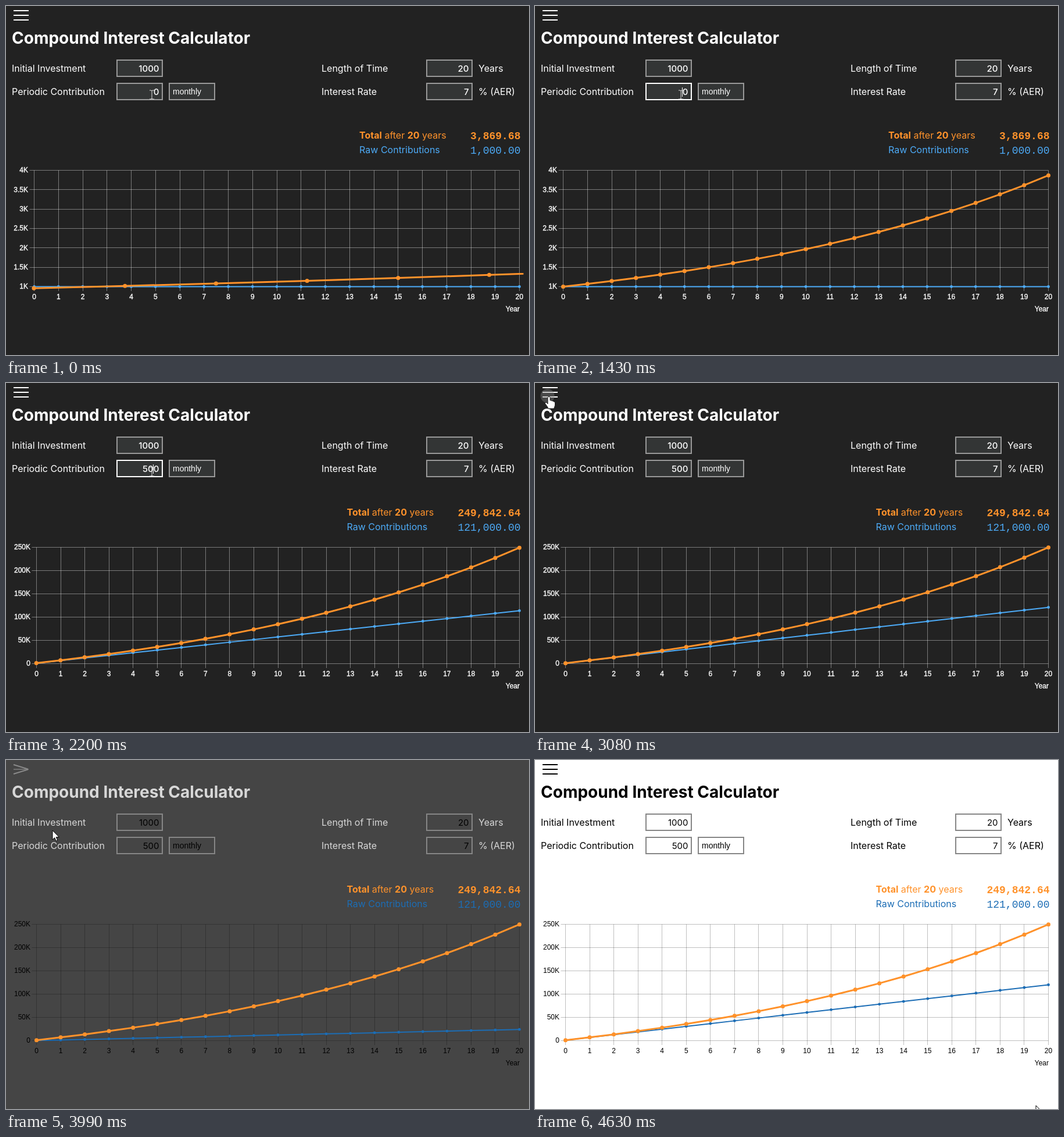
An HTML page that plays this animation: 900 px wide and 600 px high, repeating every 4.66 s.

```html
<!DOCTYPE html>
<html lang="en">
<head>
<meta charset="utf-8">
<title>Compound Interest Calculator</title>
<style>
html, body { margin: 0; width: 100%; height: 100%; overflow: hidden; }
svg { display: block; width: 900px; height: 600px; font: 16px Inter, sans-serif; }
.num { font: 18px "Liberation Mono", monospace; text-anchor: end; }
.bold { font-weight: 700; }
.field { font-size: 15px; text-anchor: end; }
.axis { font: 12px "Liberation Sans", Arial, sans-serif; }
</style>
</head>
<body>
<svg viewBox="0 0 900 600">
  <defs><clipPath id="area"><rect x="43" y="277" width="847.5" height="213"/></clipPath></defs>
  <rect id="bg" width="900" height="600"/>
  <g id="bars" stroke-width="2"><path/><path/><path/></g>
  <g id="page">
    <text x="10" y="65" font-size="28" font-weight="700">Compound Interest Calculator</text>
    <text x="10" y="113">Initial Investment</text>
    <text x="10" y="153">Periodic Contribution</text>
    <text x="543" y="113">Length of Time</text>
    <text x="543" y="153">Interest Rate</text>
    <text x="813" y="113">Years</text>
    <text x="813" y="153">% (AER)</text>
  </g>
  <g id="form"></g>
  <g id="sums"></g>
  <g id="chart"></g>
  <rect id="scrim" width="900" height="600"/>
  <circle id="press" r="12" fill="#808080" fill-opacity=".42"/>
  <g id="mouse">
    <path d="M-4 -7.5H-1L0 -6.5L1 -7.5H4M0 -6.5V6.5M-4 7.5H-1L0 6.5L1 7.5H4" fill="none" stroke="#ddd"/>
    <path d="M0 0V16L3.7 12.6L6.2 18.2L8.7 17.1L6.3 11.6H11.3Z" fill="#fff" stroke="#000"/>
    <path d="M-2 1.5Q0 -1 2 1.5V7Q4 6 5 8Q7 7 8 9Q10.5 8.500 10.500 11V15Q10 18 8.500 21H-1Q-3 16.500 -6.500 12.500Q-7 9.500 -4 10.500L-2 13Z" fill="#fff" stroke="#222"/>
  </g>
</svg>
<script>
const LOOP = 4660, RIGHT = 883.5, TOP = 282.5, BASE = 482.5, YEARS = 20;
const START = -382, FOCUS = 370, TYPE1 = 1560, TYPE2 = 1695, PRESS = 3080, OPEN = 3180, SWITCH = 3947;
const ORANGE = '#ff922b';
const $ = id => document.getElementById(id);
const clamp = x => Math.min(1, Math.max(0, x));
const mix = (a, b, k) => a + (b - a) * k;
const mixPt = (a, b, k) => [mix(a[0], b[0], k), mix(a[1], b[1], k)];
const outQuart = x => 1 - (1 - clamp(x)) ** 4;
const smooth = x => { x = clamp(x); return x * x * (3 - 2 * x); };
const grey = v => { v = Math.round(v); return `rgb(${v},${v},${v})`; };
const within = (t, a, b) => t >= a && t < b;

// CSS "ease" curve
function ease(x) {
  if (x <= 0) return 0;
  if (x >= 1) return 1;
  let lo = 0, hi = 1;
  for (let i = 0; i < 20; i++) {
    const s = (lo + hi) / 2, r = 1 - s;
    if (.75 * r * r * s + .75 * r * s * s + s ** 3 < x) lo = s; else hi = s;
  }
  return .3 * (1 - lo) ** 2 * lo + 3 * (1 - lo) * lo * lo + lo ** 3;
}

const total = (pay, k) => 1000 * 1.07 ** k + 12 * pay * (1.07 ** k - 1) / .07;
const raw = (pay, k) => 1000 + 12 * pay * k;

const plans = [
  { pay: 0, min: 1000, max: 4000, step: 500, left: 48.5 },
  { pay: 50, min: 0, max: 30000, step: 5000, left: 45.5 },
  { pay: 500, min: 0, max: 250000, step: 50000, left: 52.5 }
];
const xAt = (p, k) => mix(p.left, RIGHT, k / YEARS);
const yAt = (p, v) => mix(BASE, TOP, (v - p.min) / (p.max - p.min));
const years = Array.from({ length: YEARS + 1 }, (_, k) => k);
const goal = (p, k) => [xAt(p, k), yAt(p, total(p.pay, k))];

// Real milliseconds since the theme switch
const sinceSwitch = t => t < 4110 ? (t - SWITCH) * 1.23 : 200 + (t - 4110) * .96;

function totalPoint(t, k) {
  if (t < TYPE1) return mixPt([45 + 835 * k, 501.5], goal(plans[0], k), outQuart((t - START) / 1000));
  const first = mixPt(goal(plans[0], k), goal(plans[1], k), outQuart((Math.min(t, TYPE2) - TYPE1) / 1000));
  return t < TYPE2 ? first : mixPt(first, goal(plans[2], k), outQuart((t - TYPE2) / 1000));
}

function rawPoint(t, p, k) {
  const ms = t >= SWITCH ? sinceSwitch(t) : t - (t < TYPE1 ? START : t < TYPE2 ? TYPE1 : TYPE2);
  return [xAt(p, k), mix(BASE, yAt(p, raw(p.pay, k)), outQuart(ms / 1000))];
}

function series(pts, color, width, r) {
  const at = pts.map(q => q.map(v => v.toFixed(2)));
  return `<polyline points="${at.join(' ')}" fill="none" stroke="${color}" stroke-width="${width}" stroke-linejoin="round"/>` +
    at.map(q => `<circle cx="${q[0]}" cy="${q[1]}" r="${r}" fill="${color}"/>`).join('');
}

function drawChart(t, p, light, blue) {
  const ink = light ? '#000' : '#fff';
  let grid = '', text = '';
  const label = (x, y, anchor, s) => text += `<text x="${x}" y="${y}" text-anchor="${anchor}">${s}</text>`;
  for (const k of years) {
    const x = xAt(p, k);
    grid += `M${Math.floor(x) + .5} ${TOP}V490`;
    label(x, 504, 'middle', k);
  }
  for (let v = p.min; v <= p.max; v += p.step) {
    const y = yAt(p, v);
    grid += `M${p.left - 8} ${Math.floor(y) + .5}H${RIGHT}`;
    label(p.left - 10.5, y + 3.7, 'end', v ? v / 1000 + 'K' : 0);
  }
  label(884, 525, 'end', 'Year');
  $('chart').innerHTML =
    `<path d="${grid}" fill="none" stroke="${ink}" stroke-opacity="${light ? .25 : .4}"/>` +
    `<g class="axis" fill="${ink}" stroke="${ink}" stroke-width="${light ? 0 : .35}">${text}</g>` +
    `<g clip-path="url(#area)">${series(years.map(k => rawPoint(t, p, k)), blue, 2, 2.4)}` +
    `${series(years.map(k => totalPoint(t, k)), ORANGE, 3, 3.5)}</g>`;
}

function drawSums(p, blue) {
  const money = v => v.toLocaleString('en-US', { minimumFractionDigits: 2, maximumFractionDigits: 2 });
  const sum = money(total(p.pay, YEARS));
  const x = 694.5 - sum.length * 10.8;
  $('sums').innerHTML =
    `<g fill="${ORANGE}"><text x="${x}" y="228"><tspan class="bold">Total</tspan> after <tspan class="bold">20</tspan> years</text>` +
    `<text class="num bold" x="885.5" y="229">${sum}</text></g>` +
    `<g fill="${blue}"><text x="${x}" y="253">Raw Contributions</text>` +
    `<text class="num" x="885.5" y="254">${money(raw(p.pay, YEARS))}</text></g>`;
}

function drawForm(t, p, light) {
  const ink = light ? '#000' : '#fff';
  const focus = within(t, FOCUS, PRESS);
  const box = (x, y, on) => `<rect x="${x + 1}" y="${y + 1}" width="78" height="28" stroke-width="2" ` +
    `fill="${light ? 'none' : '#333535'}" stroke="${on ? '#fff' : light ? '#868686' : '#999'}"/>`;
  const field = (x, y, v, on) => box(x, y, on) +
    `<text class="field" x="${x + 73.5}" y="${y + 21}" fill="${ink}" font-weight="${light ? 400 : 500}">${v}</text>`;
  const since = t - (t < TYPE1 ? FOCUS : t < TYPE2 ? TYPE1 : TYPE2);
  const caret = focus && Math.floor(since / 530) % 2 === 0;
  $('form').innerHTML = field(190, 92, 1000) + field(190, 132, p.pay, focus) +
    field(723, 92, 20) + field(723, 132, 7) + box(280, 132) +
    `<text x="287" y="152" fill="${ink}" style="font:14px 'Liberation Sans',Arial,sans-serif">monthly</text>` +
    (caret ? '<path d="M253.5 140V156" stroke="#fff"/>' : '');
}

function drawBars(t, ms) {
  const open = t < SWITCH ? ease((t - OPEN) / 300) : 1 - ease(ms / 150);
  const [top, mid, low] = $('bars').children;
  const bar = (el, y, deg) => {
    el.setAttribute('d', `M13 ${y}H39`);
    el.setAttribute('transform', `rotate(${deg} 13 ${y})`);
  };
  bar(top, 8, 45 * open);
  bar(mid, 16, 0);
  bar(low, 24, -45 * open);
  mid.setAttribute('opacity', 1 - open);
  $('bars').setAttribute('stroke', grey(mix(255, 0, ease(ms / 200))));
}

function drawMouse(t) {
  const stops = [[251, 152.5], [24, 23], [80, 121], [862, 594]];
  let at = mixPt(stops[0], stops[1], smooth((t - 2500) / 480));
  if (t >= 3270) at = mixPt(stops[1], stops[2], smooth((t - 3270) / 430));
  if (t >= 4130) at = mixPt(stops[2], stops[3], smooth((t - 4130) / 500));
  const inField = t < 3000 && at[1] > 132 && at[0] > 190;
  const kind = inField ? 0 : at[0] < 42 && at[1] < 34 ? 2 : 1;
  [...$('mouse').children].forEach((el, i) => el.setAttribute('visibility', i === kind ? 'visible' : 'hidden'));
  $('mouse').setAttribute('transform', `translate(${at})`);
  const down = within(t, FOCUS, 830) || within(t, PRESS, OPEN) || within(t, 3850, SWITCH);
  $('press').setAttribute('visibility', down ? 'visible' : 'hidden');
  $('press').setAttribute('cx', at[0] - 2.5);
  $('press').setAttribute('cy', at[1] - 1);
}

function draw(t) {
  const light = t >= SWITCH;
  const ms = light ? sinceSwitch(t) : 0;
  const fade = ease(ms / 400);
  const plan = plans[t < TYPE1 ? 0 : t < TYPE2 ? 1 : 2];
  const blue = light ? '#1c6db5' : '#4dabf7';
  $('bg').setAttribute('fill', grey(mix(34, 255, fade)));
  $('page').setAttribute('fill', grey(mix(255, 0, fade)));
  $('scrim').setAttribute('fill-opacity', light ? 0 : .5 * ease((t - OPEN) / 300));
  drawBars(t, ms);
  drawForm(t, plan, light);
  drawSums(plan, blue);
  drawChart(t, plan, light, blue);
  drawMouse(t);
}

const born = performance.now();
function tick() {
  draw((performance.now() - born) % LOOP);
  requestAnimationFrame(tick);
}
tick();
</script>
</body>
</html>
```
